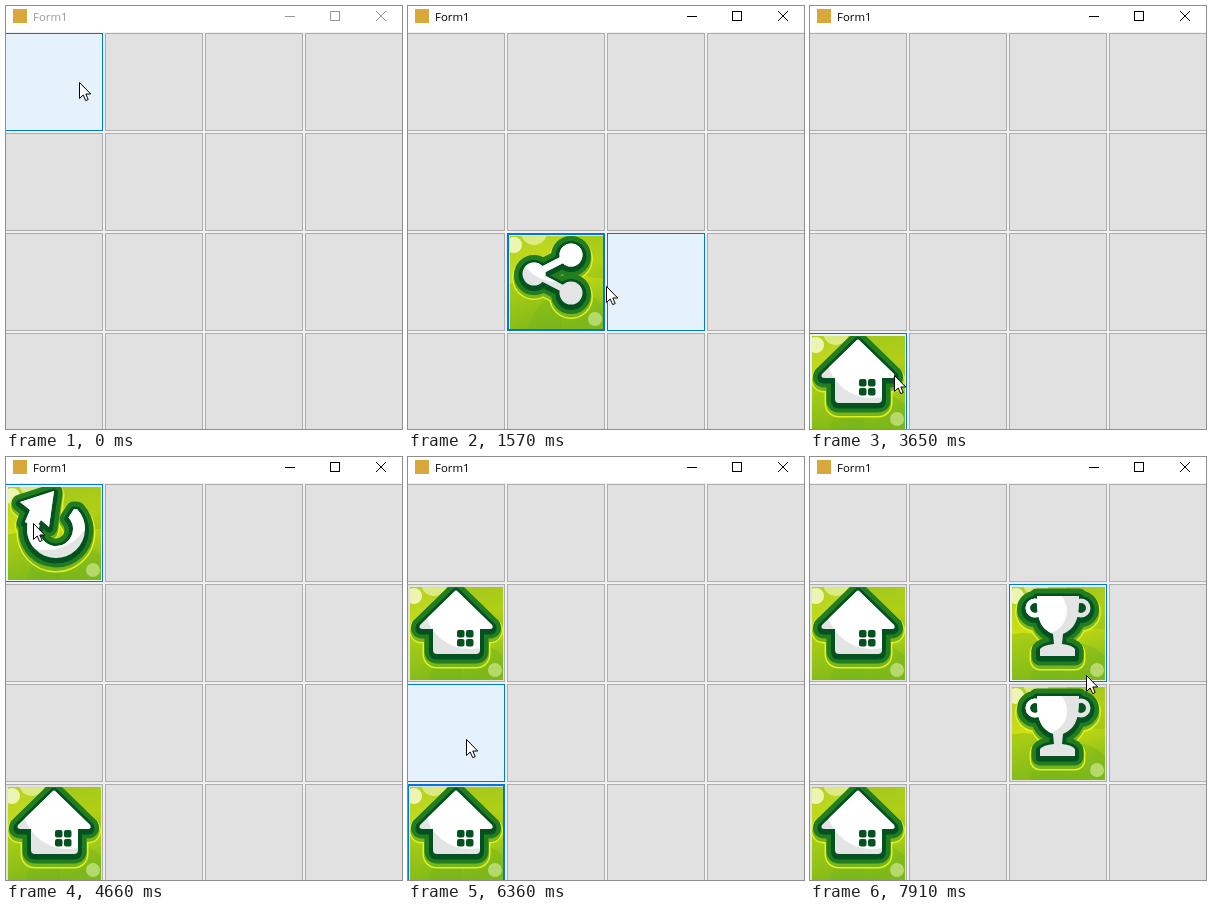
Write an HTML page with a canvas that moves like this. It is 396 by 423 pixels and loops after 7990 ms.

```html
<!DOCTYPE html>
<html lang="en">
<head>
<meta charset="utf-8">
<title>Form1</title>
<style>
  html, body { margin: 0; width: 100%; height: 100%; overflow: hidden; background: #f0f0f0; }
  canvas { display: block; }
</style>
</head>
<body>
<canvas id="stage" width="396" height="423"></canvas>
<script>
const LOOP = 7990, ACTIVATE = 120, FOCUS_DELAY = 50, REVEAL_DELAY = 75;
const PITCH = 100, CELL = 98, LEFT = -1, TOP = 27, IMAGE = 93;
const ctx = document.getElementById('stage').getContext('2d');

// Cursor stops: time, x, y
const stops = [
  [0, 73, 76], [430, 73, 76], [700, 140, 160], [860, 148, 172],
  [1200, 165, 270], [1420, 172, 276], [1570, 198, 280],
  [1980, 338, 182], [2260, 345, 190], [2500, 350, 280], [2600, 354, 298],
  [2730, 359, 341], [3050, 352, 352], [3190, 300, 362],
  [3420, 76, 366], [3650, 84, 369], [3800, 84, 369],
  [4100, 112, 250], [4400, 36, 82], [4570, 27, 66], [4800, 27, 66],
  [5100, 50, 172], [5300, 54, 184], [5560, 60, 366], [5960, 62, 372],
  [6360, 57, 282], [6740, 252, 261], [6900, 280, 266], [7200, 280, 266],
  [7560, 266, 186], [7720, 268, 192], [7910, 276, 218], [LOOP, 276, 218]
];

const turns = [
  { press: 125, col: 0, row: 0, icon: 'refresh', hide: 1260 },
  { press: 740, col: 1, row: 1, icon: 'medal', hide: 1260 },
  { press: 1240, col: 1, row: 2, icon: 'share', hide: 2420 },
  { press: 2030, col: 3, row: 1, icon: 'refresh', hide: 2420 },
  { press: 2500, col: 3, row: 2, icon: 'medal', hide: 3260 },
  { press: 2715, col: 3, row: 3, icon: 'share', hide: 3260 },
  { press: 3440, col: 0, row: 3, icon: 'house', hide: 4880 },
  { press: 4430, col: 0, row: 0, icon: 'refresh', hide: 4880 },
  { press: 5160, col: 0, row: 1, icon: 'house', hide: LOOP },
  { press: 5590, col: 0, row: 3, icon: 'house', hide: LOOP },
  { press: 7180, col: 2, row: 2, icon: 'trophy', hide: LOOP },
  { press: 7630, col: 2, row: 1, icon: 'trophy', hide: LOOP }
];

function disc(path, x, y, r, hole = 0) {
  path.moveTo(x + r, y);
  path.arc(x, y, r, 0, 7);
  if (hole) {
    path.moveTo(x + hole, y);
    path.arc(x, y, hole, 0, -7, true);
  }
}

function fillDisc(g, x, y, r, color) {
  const path = new Path2D();
  disc(path, x, y, r);
  g.fillStyle = color;
  g.fill(path);
}

// Each icon has a silhouette, a lit disc over its grey base and optional details.
const icons = {
  share: {
    lit: [46, 8, 38],
    shape() {
      const p = new Path2D('M23 35L60 16L63 22L26 41ZM26 35L63 54L60 60L23 41Z');
      for (const [x, y] of [[61, 19], [24, 38], [61, 57]]) disc(p, x, y, 11.5);
      return p;
    }
  },
  house: {
    lit: [60, 16, 46],
    shape: () => new Path2D('M45 4Q46 3 47 4L82 38Q84 42 79 42H70V63Q70 67 66 67H27Q23 67 23 63V42H13Q8 42 10 38Z'),
    details(g) {
      g.fillStyle = '#04521f';
      for (const x of [47, 56]) for (const y of [43, 52]) {
        g.beginPath();
        g.roundRect(x, y, 7.5, 7.5, 2);
        g.fill();
      }
    }
  },
  medal: {
    lit: [40, 18, 38],
    shape() {
      const p = new Path2D('M31 40L23 62L32 59L39 65L46 46L53 65L60 59L69 62L61 40Z');
      for (let i = 0; i < 24; i++) {
        const a = i * Math.PI / 12;
        disc(p, 46 + 21.5 * Math.cos(a), 23 + 21.5 * Math.sin(a), 3);
      }
      disc(p, 46, 23, 22);
      return p;
    },
    details(g) {
      fillDisc(g, 46, 23, 17, '#04521f');
      fillDisc(g, 46, 23, 15.5, '#dfe9df');
      fillDisc(g, 46, 23, 14, '#06582a');
      g.beginPath();
      for (let i = 0; i < 10; i++) {
        const a = i * Math.PI / 5 - Math.PI / 2, r = i % 2 ? 5 : 10;
        g.lineTo(46 + r * Math.cos(a), 23 + r * Math.sin(a));
      }
      g.fillStyle = '#fff';
      g.fill();
    }
  },
  refresh: {
    lit: [38, 16, 47],
    shape() {
      const p = new Path2D('M12 15L46 4L41 40L33 33L28 41L17 35L22 23Z');
      p.moveTo(66, 22);
      p.arc(48, 42, 29, -.75, 3.4);
      p.arc(48, 42, 17, 3.4, -.75, true);
      p.closePath();
      return p;
    }
  },
  trophy: {
    lit: [32, 24, 23],
    shape() {
      const p = new Path2D('M25 9H67V14C67 34 62 42 51 47L50 57Q60 58 63 62V69H28V62Q31 58 42 57L41 47C30 42 25 34 25 14Z');
      disc(p, 23, 21, 9.5, 5);
      disc(p, 69, 21, 9.5, 5);
      return p;
    }
  }
};

function paintBackdrop(g) {
  const fill = g.createLinearGradient(20, 0, 50, IMAGE);
  fill.addColorStop(0, '#b3d224');
  fill.addColorStop(.45, '#cfe012');
  fill.addColorStop(1, '#83ba1c');
  g.fillStyle = fill;
  g.fillRect(0, 0, IMAGE, IMAGE);
  fillDisc(g, 88, 8, 34, 'rgba(120,175,25,.35)');
  fillDisc(g, 12, 86, 40, 'rgba(110,175,25,.4)');
  fillDisc(g, 62, 100, 44, 'rgba(115,180,25,.4)');
  fillDisc(g, 4, 9, 8, 'rgba(255,255,225,.75)');
  fillDisc(g, 24, -4, 13, 'rgba(255,255,225,.5)');
  fillDisc(g, 85, 83, 7, 'rgba(240,250,190,.5)');
}

function makeTile(icon) {
  const tile = document.createElement('canvas');
  tile.width = tile.height = IMAGE;
  const g = tile.getContext('2d'), shape = icon.shape();
  paintBackdrop(g);
  g.lineJoin = 'round';
  const halos = [[21, 4, '#e2ef20'], [18, 4, '#78b41c'], [17, 1, '#217d20'], [8, 1.5, '#04521f']];
  for (const [width, dy, color] of halos) {
    g.save();
    g.translate(0, dy);
    g.lineWidth = width;
    g.strokeStyle = g.fillStyle = color;
    g.stroke(shape);
    g.fill(shape);
    g.restore();
  }
  g.fillStyle = '#e3e5e4';
  g.fill(shape);
  g.save();
  g.clip(shape);
  fillDisc(g, ...icon.lit, '#fff');
  g.restore();
  icon.details?.(g);
  return tile;
}

const tiles = Object.fromEntries(Object.entries(icons).map(([name, icon]) => [name, makeTile(icon)]));
const arrow = new Path2D('M.5 .5V16.5L4.2 13L6.7 18.6L9.2 17.5L6.8 12H11.7Z');

function cursorAt(t) {
  const i = Math.max(1, stops.findIndex(s => s[0] > t));
  const [t0, x0, y0] = stops[i - 1], [t1, x1, y1] = stops[i];
  const k = (t - t0) / (t1 - t0);
  return { x: Math.round(x0 + (x1 - x0) * k), y: Math.round(y0 + (y1 - y0) * k) };
}

function drawTitleBar(active) {
  ctx.fillStyle = '#fff';
  ctx.fillRect(0, 0, 396, 26);
  ctx.fillStyle = '#d9a83a';
  ctx.fillRect(7, 3, 14, 14);
  const ink = active ? '#000' : '#999';
  ctx.fillStyle = ctx.strokeStyle = ink;
  ctx.font = '11.4px "Open Sans", "Noto Sans", sans-serif';
  ctx.fillText('Form1', 27, 15);
  ctx.lineWidth = 1;
  ctx.fillRect(279, 10, 10, 1);
  ctx.strokeRect(324.5, 5.5, 9, 9);
  ctx.stroke(new Path2D('M370 5L380 15M380 5L370 15'));
}

function drawFrame(x, y, color, width) {
  ctx.strokeStyle = color;
  ctx.lineWidth = width;
  ctx.strokeRect(x + width / 2, y + width / 2, CELL - width, CELL - width);
}

function drawCell(t, col, row, hovered, focused) {
  const x = LEFT + col * PITCH, y = TOP + row * PITCH;
  const here = turns.filter(turn => turn.col === col && turn.row === row);
  const pressed = here.find(turn => t >= turn.press && t < turn.press + REVEAL_DELAY);
  const shown = here.find(turn => t >= turn.press + REVEAL_DELAY && t < turn.hide);
  let face = '#e1e1e1', border = '#adadad', width = 1;
  if (pressed) {
    const down = t >= pressed.press + FOCUS_DELAY;
    face = down ? '#cce4f7' : '#e5f1fb';
    border = down ? '#005499' : '#3f6a8c';
  } else if (hovered) {
    face = '#e5f1fb';
    border = '#0078d7';
  } else if (focused) {
    border = '#0078d7';
    width = 2;
  }
  ctx.fillStyle = face;
  ctx.fillRect(x, y, CELL, CELL);
  if (shown) ctx.drawImage(tiles[shown.icon], x + 3, y + 3);
  drawFrame(x, y, border, width);
}

function draw(t) {
  const cursor = cursorAt(t);
  const hoverCol = Math.floor((cursor.x + 2) / PITCH);
  const hoverRow = Math.floor((cursor.y - TOP) / PITCH);
  const focus = turns.findLast(turn => t >= turn.press + FOCUS_DELAY);
  ctx.fillStyle = '#f0f0f0';
  ctx.fillRect(0, 0, 396, 423);
  drawTitleBar(t >= ACTIVATE);
  for (let row = 0; row < 4; row++) for (let col = 0; col < 4; col++) {
    drawCell(t, col, row,
      col === hoverCol && row === hoverRow,
      focus?.col === col && focus.row === row);
  }
  ctx.save();
  ctx.translate(cursor.x, cursor.y);
  ctx.fillStyle = '#fff';
  ctx.strokeStyle = '#000';
  ctx.lineWidth = 1;
  ctx.fill(arrow);
  ctx.stroke(arrow);
  ctx.restore();
}

const start = performance.now();
function tick() {
  draw((performance.now() - start) % LOOP);
  requestAnimationFrame(tick);
}
tick();
</script>
</body>
</html>
```
